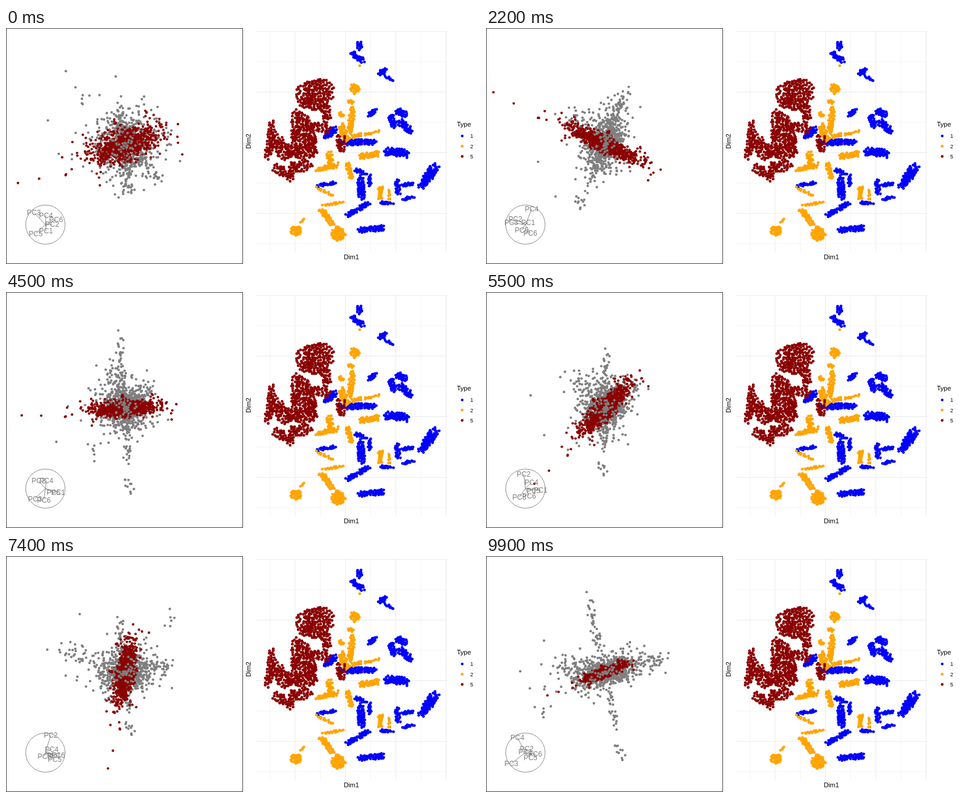
An HTML page with a canvas that plays this animation: 800x400 px, repeating every 10 s.

```html
<!DOCTYPE html>
<html lang="en">
<head>
<meta charset="utf-8">
<title>Projection tour</title>
<style>
  html, body { margin: 0; width: 100%; height: 100%; overflow: hidden; background: #fff; }
  svg, canvas { position: absolute; left: 0; top: 0; width: 800px; height: 400px; }
  text { font-family: "Liberation Sans", Arial, sans-serif; font-size: 11px; }
  .axis text { font-size: 12px; fill: #7f7f7f; text-anchor: middle; }
  .axis line, .axis circle { stroke: #7f7f7f; fill: none; stroke-width: .9; }
  .key text { font-size: 9px; }
</style>
</head>
<body>
<svg viewBox="0 0 800 400">
  <rect x=".5" y=".5" width="399" height="399" fill="none" stroke="#444"/>
  <g id="grid" stroke="#ebebeb"></g>
  <text x="583" y="392" text-anchor="middle">Dim1</text>
  <text transform="translate(413 192) rotate(-90)" text-anchor="middle">Dim2</text>
  <text x="761" y="167">Type</text>
  <g id="key" class="key"></g>
</svg>
<canvas id="map" width="800" height="400"></canvas>
<canvas id="tour" width="800" height="400"></canvas>
<svg viewBox="0 0 800 400"><g id="axes" class="axis"><circle cx="66.5" cy="333.2" r="33.2"/></g></svg>
<script>
const SVG = 'http://www.w3.org/2000/svg';
const GREY = '#7f7f7f', RED = '#8b0000', BLUE = '#00f', ORANGE = '#ffa500';
const TAU = 2 * Math.PI;
const byId = id => document.getElementById(id);

let seed = 20;
function rand() {
  seed = (seed + 0x6d2b79f5) | 0;
  let h = Math.imul(seed ^ (seed >>> 15), 1 | seed);
  h = (h + Math.imul(h ^ (h >>> 7), 61 | h)) ^ h;
  return ((h ^ (h >>> 14)) >>> 0) / 4294967296;
}
const gauss = () => Math.sqrt(-2 * Math.log(1 - rand())) * Math.cos(TAU * rand());

function add(parent, tag, attrs, text = '') {
  const el = document.createElementNS(SVG, tag);
  for (const name in attrs) el.setAttribute(name, attrs[name]);
  el.textContent = text;
  return parent.appendChild(el);
}

function dot(ctx, x, y, r) {
  ctx.beginPath();
  ctx.arc(x, y, r, 0, TAU);
  ctx.fill();
}

// Major and minor grid lines alternate
for (let i = 0; i < 8; i++) {
  const x = 445.4 + 42.5 * i, y = 5.8 + 51.4 * i;
  add(byId('grid'), 'line', { x1: x, x2: x, y1: 5, y2: 379, 'stroke-width': i % 2 ? 1.1 : .55 });
  add(byId('grid'), 'line', { x1: 421, x2: 745, y1: y, y2: y, 'stroke-width': i % 2 ? .55 : 1.1 });
}
[BLUE, ORANGE, RED].forEach((fill, i) => {
  const y = 183 + 17.3 * i;
  add(byId('key'), 'circle', { cx: 770, cy: y, r: 2.3, fill });
  add(byId('key'), 'text', { x: 783.5, y: y + 3.3 }, '125'[i]);
});

// A stroke is x1, y1, x2, y2, half width.
// Of several random spots keep the loneliest, for an even spread
function scatter([x1, y1, x2, y2, w], density) {
  const len = Math.hypot(x2 - x1, y2 - y1);
  const count = Math.max(1, Math.round(density * (len * 2 * w + Math.PI * w * w)));
  const spots = [];
  while (spots.length < count) {
    let best, bestGap = -1;
    for (let k = 0; k < 4; k++) {
      const u = rand(), r = w * Math.sqrt(rand()), a = TAU * rand();
      const x = x1 + (x2 - x1) * u + r * Math.cos(a);
      const y = y1 + (y2 - y1) * u + r * Math.sin(a);
      const gap = Math.min(1e4, ...spots.map(p => Math.hypot(p[0] - x, p[1] - y)));
      if (gap > bestGap) { bestGap = gap; best = [x, y]; }
    }
    spots.push(best);
  }
  return spots;
}

const map = byId('map').getContext('2d');
function paint(color, density, strokes) {
  map.fillStyle = color;
  for (const s of strokes) for (const [x, y] of scatter(s, density)) dot(map, x, y, 2.4);
}

paint(BLUE, .105, [
  [596, 24, 597, 34, 4], [585, 44, 602, 56, 5],
  [630, 78, 640, 70, 4], [638, 80, 654, 90, 2],
  [612, 148, 624, 138, 4], [650, 150, 654, 166, 5],
  [662, 141, 674, 147, 6], [666, 160, 682, 174, 6],
  [541, 184, 554, 172, 6], [568, 194, 622, 193, 5],
  [642, 209, 676, 213, 7], [526, 268, 556, 262, 3],
  [592, 241, 606, 248, 4], [598, 255, 601, 288, 6],
  [613, 250, 614, 268, 3], [576, 317, 612, 297, 4],
  [597, 343, 636, 339, 5], [632, 296, 654, 297, 2.5],
  [660, 260, 662, 280, 4], [668, 266, 688, 264, 3],
  [670, 291, 688, 286, 3], [703, 266, 724, 236, 8]
]);

// Steps of the tour at which the poses hold
const keys = [0, 12, 31, 45, 65, 82, 99];

// Axis directions PC1..PC6 at each key, x and y in turn, y up
const bases = [
  [.03, -.33, .35, 0, -.6, .64, .03, .48, -.5, -.45, .55, .24],
  [-.2, -.15, -.1, .39, -.74, .24, .35, .82, -.26, -.15, .5, -.21],
  [.41, .3, -.74, .24, -.5, .12, .2, .55, -.08, -.33, -.05, -.64],
  [.65, -.18, -.35, .4, -.53, -.52, .05, .42, .41, -.2, -.08, -.58],
  [.68, -.21, .2, .94, 0, -.12, .47, .03, .3, -.12, .4, -.12],
  [.15, 0, .3, .79, -.08, -.24, .14, .33, .56, -.45, .77, -.1],
  [0, .06, .07, .2, -.72, -.58, -.41, .76, .26, -.24, .5, -.06]
];

const mix = (a, b, u) => a.map((v, i) => v + (b[i] - v) * u);
const inner = (a, b) => a.reduce((sum, v, i) => sum + v * b[i], 0);
const unit = v => { const len = Math.sqrt(inner(v, v)); return v.map(c => c / len); };

const axes = [1, 2, 3, 4, 5, 6].map(i => ({
  line: add(byId('axes'), 'line', { x1: 66.5, y1: 333.2 }),
  label: add(byId('axes'), 'text', {}, 'PC' + i)
}));

function drawAxes(k, u) {
  const flat = mix(bases[k], bases[k + 1], u);
  const xs = unit(flat.filter((_, i) => i % 2 === 0));
  const raw = flat.filter((_, i) => i % 2);
  const lean = inner(xs, raw);
  const ys = unit(raw.map((v, i) => v - lean * xs[i]));
  axes.forEach(({ line, label }, i) => {
    const x = 66.5 + 33.2 * xs[i], y = 333.2 - 33.2 * ys[i];
    line.setAttribute('x2', x);
    line.setAttribute('y2', y);
    label.setAttribute('x', x);
    label.setAttribute('y', y + 4.3);
  });
}

paint(ORANGE, .1, [
  [587, 103, 590, 104, 8], [597, 64, 597, 64, .1],
  [578, 124, 587, 126, 3], [563, 142, 568, 150, 3],
  [585, 138, 580, 175, 5], [566, 165, 573, 190, 5],
  [606, 180, 629, 175, 2], [575, 186, 598, 181, 3],
  [597, 218, 627, 213, 5], [545, 212, 550, 235, 5],
  [526, 240, 561, 232, 4], [576, 230, 583, 255, 4],
  [525, 271, 552, 283, 2], [532, 300, 568, 296, 2],
  [532, 307, 550, 332, 5], [558, 347, 562, 350, 11],
  [489, 343, 491, 344, 9], [498, 330, 503, 324, 2],
  [632, 270, 632, 290, 4], [646, 275, 647, 290, 2]
]);

// Ellipses: major and minor deviation, tilt in degrees
const redPose = [
  [33, 14, -20], [32, 7, 44], [39, 7, 8], [30, 7, -4], [30, 9, -90], [27, 7, -71], [18, 4, -22]
];
const corePose = [
  [27, 24, -10], [25, 20, -40], [26, 12, -90], [20, 20, -90], [25, 18, -10], [23, 18, 0], [31, 13, -13]
];

// Arms: tip offset from the centre at each key; a spine reaches both ways
const spine = [[-10, -75], [74, -100], [16, -105], [-9, -138], [15, -75], [-33, -120], [-29, -142]];
const leftArm = [[2, 75], [-90, -45], [-45, -80], [-30, -85], [-85, -45], [-140, -55], [-90, -25]];
const rightArm = [[55, 60], [55, -50], [-10, -120], [40, -42], [65, -50], [80, 15], [100, -28]];
const strays = [[-77, -88], [-70, 80], [-18, -122], [-56, 70], [108, -92], [60, -105], [-112, 68]];

const points = [];
function ellipse(color, n, pose, size = 1) {
  for (let i = 0; i < n; i++) {
    const s = size * (rand() < .1 ? 1.55 : .95);
    points.push({ color, pose, a: gauss() * s, b: gauss() * s, jx: 1, jy: -3 });
  }
}
function arm(n, w, pose, from) {
  for (let i = 0; i < n; i++) {
    points.push({ color: GREY, pose, a: from + (1 - from) * rand(), b: 0, jx: w * gauss(), jy: w * gauss() });
  }
}
ellipse(GREY, 640, corePose);
arm(90, 3.5, spine, -1);
arm(55, 9, leftArm, 0);
arm(55, 9, rightArm, 0);
arm(6, 5, strays, .85);
ellipse(RED, 720, redPose);
ellipse(GREY, 45, corePose, .5);

// Turns a pose into the two vectors that span its points
function span(pose, k, u) {
  const [p, q, tilt] = mix(pose[k], pose[k + 1], u);
  if (tilt === undefined) return [p, q, 0, 0];
  const c = Math.cos(tilt * TAU / 360), s = Math.sin(tilt * TAU / 360);
  return [p * c, p * s, -q * s, q * c];
}

const tour = byId('tour').getContext('2d');
function drawTour(step) {
  let k = 0;
  while (k < keys.length - 2 && step >= keys[k + 1]) k++;
  const u = (step - keys[k]) / (keys[k + 1] - keys[k]);
  const spans = new Map();
  tour.clearRect(0, 0, 400, 400);
  for (const { color, pose, a, b, jx, jy } of points) {
    if (!spans.has(pose)) spans.set(pose, span(pose, k, u));
    const [px, py, qx, qy] = spans.get(pose);
    tour.fillStyle = color;
    dot(tour, 200 + a * px + b * qx + jx, 200 + a * py + b * qy + jy, 2.15);
  }
  drawAxes(k, u);
}

paint(RED, .056, [
  [508, 110, 536, 106, 20], [498, 127, 535, 130, 10],
  [488, 143, 490, 195, 8], [500, 150, 514, 200, 12],
  [516, 182, 519, 215, 7], [538, 130, 541, 155, 8],
  [520, 166, 543, 172, 8], [450, 161, 443, 218, 7],
  [457, 190, 470, 213, 12], [480, 205, 510, 214, 13],
  [455, 236, 482, 253, 8], [482, 236, 509, 234, 9],
  [565, 186, 566, 206, 8]
]);

let shown = -1;
const start = performance.now();
function tick() {
  const step = Math.floor((performance.now() - start) / 100) % 100;
  if (step !== shown) drawTour(shown = step);
  requestAnimationFrame(tick);
}
tick();
</script>
</body>
</html>
```
